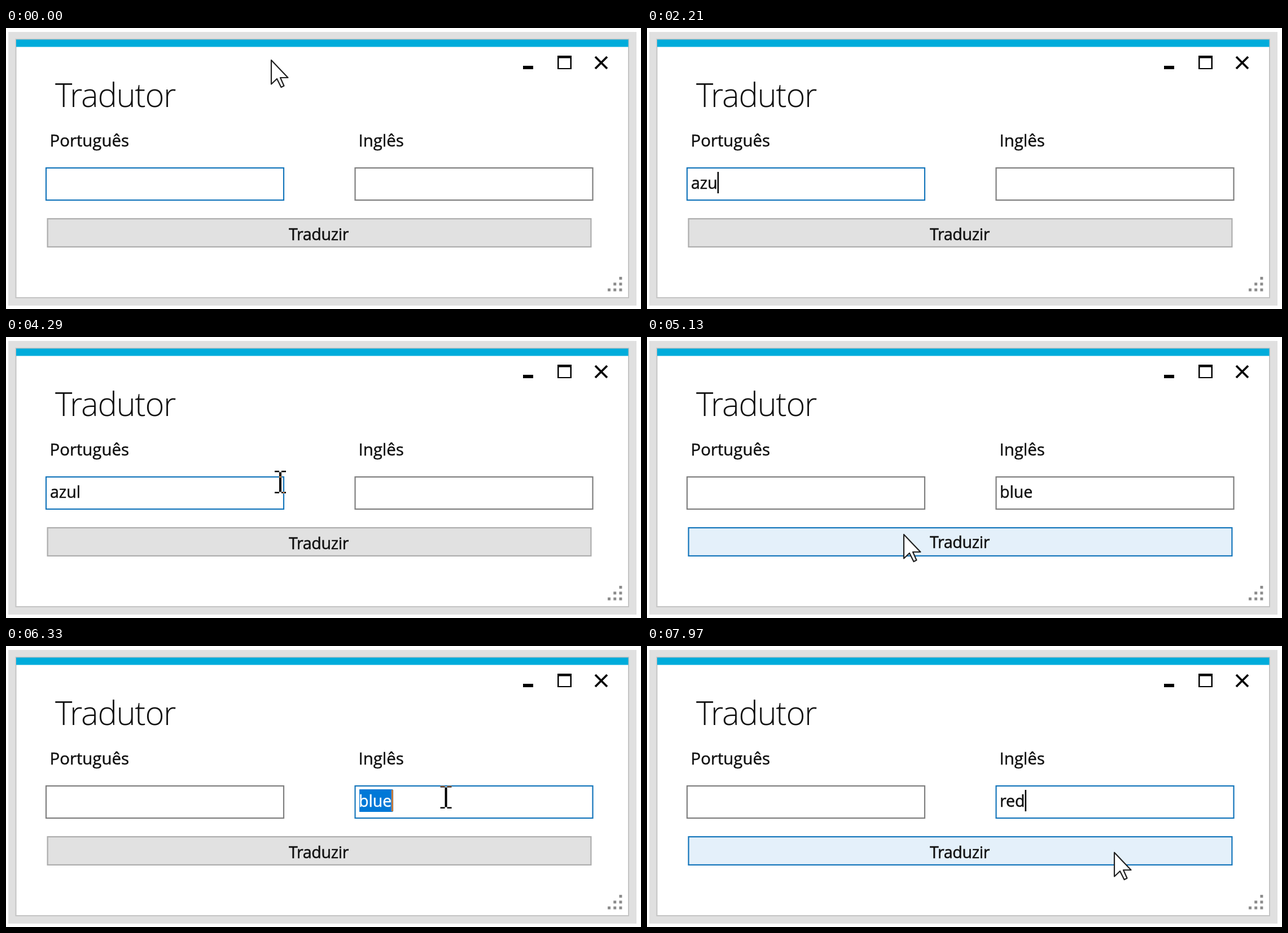
Recreate the animation shown at these times as an HTML page. Size 1125 by 498 pixels, loop 8 s.

```html
<!DOCTYPE html>
<html lang="pt">
<head>
<meta charset="utf-8">
<title>Tradutor</title>
<style>
  html, body { margin: 0; width: 100%; height: 100%; overflow: hidden; background: #fff; }
  svg { display: block; width: 1125px; height: 498px; filter: blur(.6px); }
  text {
    font: 28.5px "Open Sans", "Noto Sans", sans-serif; white-space: pre;
    fill: #111; stroke: #111; stroke-width: .5px;
  }
  .title { font-size: 58px; font-weight: 300; letter-spacing: -1.4px; stroke: none; }
  .label { font-size: 29.4px; }
  .action { text-anchor: middle; letter-spacing: -.3px; }
  .field { fill: #fff; stroke-width: 2.2; }
  .invert { fill: #fff; mix-blend-mode: difference; }
  .selected { fill: #fff; stroke: #fff; }
</style>
</head>
<body>
<svg viewBox="0 0 1125 498">
  <rect width="1125" height="498" fill="#fff"/>
  <rect x="4" y="7" width="1113" height="485" fill="#e0e0e0"/>
  <rect x="17.5" y="20" width="1085.5" height="458" fill="#fff" stroke="#c4c4c4" stroke-width="2"/>
  <rect x="18" y="20.5" width="1084.5" height="13" fill="#00acdb"/>

  <rect x="916" y="67" width="18" height="6" fill="#000"/>
  <path d="M977 49h25v24h-25zM979.5 53.5v17.5h20v-17.5z" fill="#000" fill-rule="evenodd"/>
  <path d="M1044 51l21 21M1065 51l-21 21" stroke="#000" stroke-width="3.8"/>
  <g id="grip" fill="#8c8c8c"></g>

  <text class="title" x="87" y="140">Tradutor</text>
  <text class="label" x="77.5" y="210">Português</text>
  <text class="label" x="624.5" y="210">Inglês</text>

  <rect class="field" id="ptBox" x="71" y="248" width="421" height="57"/>
  <rect class="field" id="enBox" x="618.5" y="248" width="421" height="57"/>
  <rect id="selection" x="626" y="254" height="40" fill="#0078d7"/>
  <text id="ptText" x="78" y="285"></text>
  <text id="enText" x="625" y="285"></text>

  <rect id="button"/>
  <text class="action" id="action" x="554">Traduzir</text>

  <rect class="invert" id="caret" y="255" width="2.5" height="38"/>
  <path class="invert" id="beam" d="M-10-20h8v2.4h4v-2.4h8v2.4h-8v35.2h8v2.4h-8v-2.4h-4v2.4h-8v-2.4h8v-35.2h-8z"/>
  <path id="arrow" d="M0 0V42.5L10 33 17.5 48 22.5 45.5 16 31H29.5Z"
        fill="#fff" stroke="#222" stroke-width="2.2" stroke-linejoin="round"/>
</svg>
<script>
const LOOP = 8000, STEP = 80, BLINK = 530;
const PRESS = 4730, RESULT = 4850, REFOCUS = 6050, SELECT = 6130;
const ACCENT = "#1576bb";

// time, x, y of the pointer's hot spot
const path = [
  [0, 470, 57], [160, 470, 57], [760, 486, 257], [4330, 486, 257],
  [4650, 455, 350], [5210, 455, 350], [5850, 761.5, 285],
  [6010, 779.5, 268], [7500, 779.5, 268], [7890, 828, 366], [LOOP, 828, 366]
];
const hidden = [[1890, 4130], [6530, 7500]];

// time, text
const ptSteps = [[0, ""], [1890, "a"], [2010, "az"], [2170, "azu"], [2410, "azul"], [RESULT, ""]];
const enSteps = [[0, ""], [RESULT, "blue"], [6530, "r"], [6690, "re"], [6850, "red"]];
const caretResets = [-660, 1890, 2010, 2170, 2410, REFOCUS, 6530, 6690, 6850];

const el = {};
document.querySelectorAll("[id]").forEach(node => el[node.id] = node);

const set = (node, attrs) => {
  for (const name in attrs) node.setAttribute(name, attrs[name]);
};
const show = (node, on) => { node.style.display = on ? "" : "none"; };
const within = (t, [from, to]) => t >= from && t < to;
const current = (steps, t) => steps.filter(s => s[0] <= t).pop()[1];
const inside = (p, x, y, w, h) => p.x >= x && p.x <= x + w && p.y >= y && p.y <= y + h;

for (let row = 0; row < 3; row++) {
  for (let col = 2 - row; col < 3; col++) {
    const dot = document.createElementNS("http://www.w3.org/2000/svg", "rect");
    set(dot, { x: 1066 + col * 10.2, y: 441 + row * 10.3, width: 5, height: 5 });
    el.grip.append(dot);
  }
}

function pointerAt(t) {
  let i = 1;
  while (i < path.length - 1 && path[i][0] <= t) i++;
  const [t0, x0, y0] = path[i - 1], [t1, x1, y1] = path[i];
  const u = Math.min(1, (t - t0) / (t1 - t0));
  const k = u * u * (3 - 2 * u);
  return { x: x0 + (x1 - x0) * k, y: y0 + (y1 - y0) * k };
}

function drawButton(hover, focused, pressed) {
  const line = focused && !hover ? 4.5 : 2.2;
  const idle = focused ? "#0078d7" : "#adadad";
  set(el.button, {
    x: 72.5 + line / 2, y: 337 + line / 2, width: 965 - line, height: 52 - line,
    fill: pressed ? "#cce4f7" : hover ? "#e4f0fa" : "#e1e1e1",
    stroke: pressed ? "#005499" : hover ? ACCENT : idle,
    "stroke-width": line
  });
  set(el.action, { y: focused ? 374 : 376 });
}

function drawCaret(t, focus) {
  const since = t - caretResets.filter(r => r <= t).pop();
  const on = Math.floor(since / BLINK) % 2 === 0;
  show(el.caret, on && focus !== "button");
  const text = focus === "pt" ? el.ptText : el.enText;
  set(el.caret, { x: +text.getAttribute("x") + text.getComputedTextLength() });
}

function draw(time) {
  const t = Math.max(0, Math.floor((time - 10) / STEP) * STEP + 10);
  const p = pointerAt(t);
  const focus = t < PRESS ? "pt" : t < REFOCUS ? "button" : "en";
  const overPt = inside(p, 70, 247, 423, 59);
  const overEn = inside(p, 617, 247, 423, 59);
  const overButton = inside(p, 73, 337, 964, 52);
  const border = (name, over) => focus === name ? ACCENT : over ? "#505050" : "#7f7f7f";

  set(el.ptBox, { stroke: border("pt", overPt) });
  set(el.enBox, { stroke: border("en", overEn) });
  el.ptText.textContent = current(ptSteps, t);
  el.enText.textContent = current(enSteps, t);

  const selected = within(t, [SELECT, 6530]);
  show(el.selection, selected);
  set(el.selection, { width: el.enText.getComputedTextLength() + 1 });
  el.enText.classList.toggle("selected", selected);

  drawButton(overButton, focus === "button", within(t, [PRESS, RESULT]));
  drawCaret(t, focus);

  const visible = !hidden.some(span => within(t, span));
  const typing = overPt || overEn;
  show(el.beam, visible && typing);
  show(el.arrow, visible && !typing);
  const place = { transform: `translate(${p.x} ${p.y})` };
  set(el.beam, place);
  set(el.arrow, place);
}

const start = performance.now();
function tick() {
  draw((performance.now() - start) % LOOP);
  requestAnimationFrame(tick);
}
tick();
</script>
</body>
</html>
```
